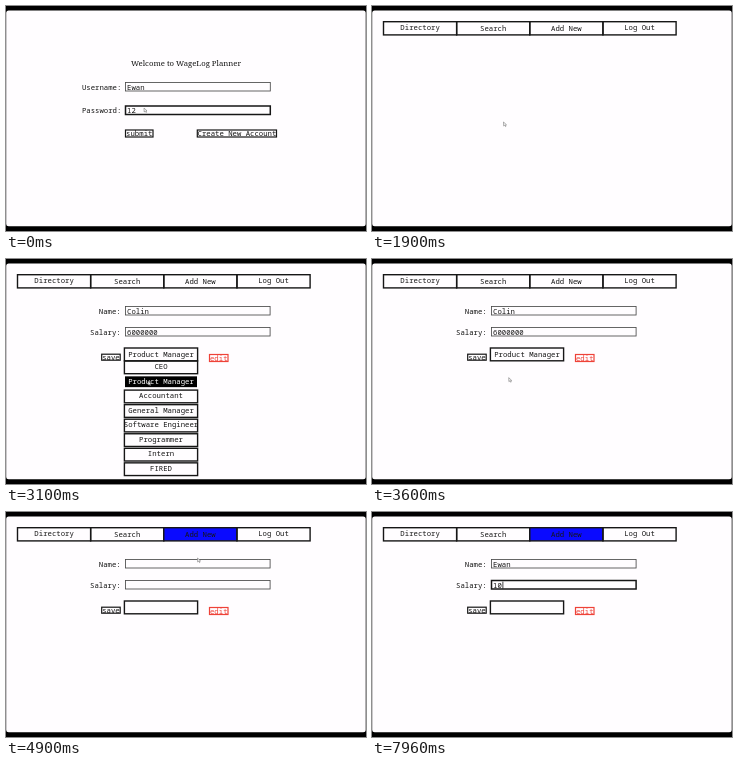
These frames come from a looping animation (360 px wide and 225 px high, 8 s). An HTML page with a canvas:

```html
<!DOCTYPE html>
<html lang="en">
<head>
<meta charset="utf-8">
<style>
html, body { margin: 0; width: 100%; height: 100%; overflow: hidden; background: #000; }
canvas { display: block; width: 360px; height: 225px; }
</style>
</head>
<body>
<canvas id="stage" width="360" height="225"></canvas>
<script>
const ctx = document.getElementById('stage').getContext('2d');
const LOOP = 8000, TRAVEL = 260, KEY_GAP = 150;
const INK = '#161616', GREY = '#4a4a4a', BLUE = '#0a0aff', RED = '#ee4238', PAPER = '#fffdff';
const MONO = '500 7.3px "Noto Sans Mono", "DejaVu Sans Mono", monospace';
const SERIF = '7.75px "Noto Serif", serif';

const NAV = ['Directory', 'Search', 'Add New', 'Log Out'];
const ROLES = ['CEO', 'Product Manager', 'Accountant', 'General Manager',
  'Software Engineer', 'Programmer', 'Intern', 'FIRED'];

const signedIn = 1600, searchOpen = 2440, formOpen = 2740, listOpen = 2900,
  listShut = 3540, searchAgain = 4080, addNew = 4680;

// The pointer rests at each stop until TRAVEL ms before the next arrival
const STOPS = [
  { at: 0, x: 138, y: 102 },
  { at: 700, x: 143, y: 127 },
  { at: 1400, x: 134, y: 84 },
  { at: 1740, x: 131.5, y: 116 },
  { at: 2160, x: 50, y: 22 },
  { at: 2440, x: 120, y: 23 },
  { at: 2700, x: 150, y: 46 },
  { at: 3000, x: 142, y: 122 },
  { at: 3800, x: 104, y: 98 },
  { at: 4060, x: 122, y: 24 },
  { at: 4240, x: 169.5, y: 50 },
  { at: 4600, x: 192, y: 23 },
  { at: 4900, x: 191.5, y: 46 },
  { at: 5460, x: 150, y: 52 },
  { at: 5800, x: 132, y: 75 }
];

function pointerAt(t) {
  return STOPS.reduce((from, to) => {
    const begin = Math.max(from.at, to.at - TRAVEL);
    const u = Math.min(1, Math.max(0, (t - begin) / (to.at - begin)));
    const e = u * u * (3 - 2 * u);
    return { at: to.at, x: from.x + (to.x - from.x) * e, y: from.y + (to.y - from.y) * e };
  });
}

function text(s, x, y, align = 'left', color = INK, font = MONO) {
  ctx.font = font;
  ctx.textAlign = align;
  ctx.fillStyle = color;
  ctx.fillText(s, x, y + 2.5);
}

function box(x, y, w, h, line = 1.3, color = INK, fill) {
  if (fill) {
    ctx.fillStyle = fill;
    ctx.fillRect(x, y, w, h);
  }
  ctx.strokeStyle = color;
  ctx.lineWidth = line;
  ctx.strokeRect(x, y, w, h);
}

const inside = (p, x, y, w, h) => p.x >= x && p.x <= x + w && p.y >= y && p.y <= y + h;

function button(label, x, y, w, h, p, color = INK) {
  box(x, y, w, h, 1.2, color, inside(p, x, y, w, h) ? BLUE : null);
  text(label, x + w / 2, y + h / 2, 'center', color);
}

function field(label, labelX, x, y, w, value, focused) {
  text(label, labelX, y + 4.6, 'right');
  box(x, y, w, 8.5, focused ? 1.5 : 0.85, focused ? INK : GREY);
  text(value, x + 1.5, y + 4.6);
}

function login(t, p) {
  text('Welcome to WageLog Planner', 180, 57, 'center', INK, SERIF);
  field('Username:', 115.3, 119.5, 76.5, 144.8, 'Ewan', false);
  field('Password:', 115.3, 119.5, 100, 144.8, t < 100 ? '12' : '123', true);
  button('submit', 119.5, 124, 27.5, 7, p);
  button('Create New Account', 191.3, 124, 79.2, 7, p);
}

function nav(p, active) {
  const w = 73.15;
  NAV.forEach((label, i) => {
    const x = 11.5 + i * w;
    const lit = i === active || inside(p, x, 15.7, w, 13);
    box(x, 15.7, w, 13.2, 1.4, INK, lit ? BLUE : null);
    text(label, x + w / 2, i % 3 ? 22.6 : 21.8, 'center');
  });
}

function form(p, name, salary, role, focus) {
  field('Name:', 114.7, 119.5, 47.5, 144.6, name, focus === 'name');
  field('Salary:', 114.7, 119.5, 68.5, 144.6, salary, focus === 'salary');
  button('save', 95.7, 95.2, 18.5, 6, p);
  button('edit', 203.5, 95.5, 18.5, 7, p, RED);
  box(118.4, 89, 73.2, 12.8, 1.4);
  text(role, 155, 95, 'center');
}

function roleList(p) {
  const step = 14.55;
  ROLES.forEach((role, i) => {
    const y = 101.2 + i * step;
    const hot = inside(p, 118, y, 74, step);
    if (hot) {
      ctx.fillStyle = '#000';
      ctx.fillRect(119, y + 1.6, 72, 10.8);
    } else {
      box(118.4, y + 0.8, 73.2, 12.7, 1.4);
    }
    text(role, 155, y + 6.4, 'center', hot ? '#fff' : INK);
  });
}

const ARROW = new Path2D('M0 0 L.2 4 L1.1 3.2 L2 4.6 L2.5 4.2 L1.9 2.9 L3 2.8 Z');

function pointer(p) {
  ctx.save();
  ctx.translate(p.x, p.y);
  ctx.fillStyle = '#fff';
  ctx.fill(ARROW);
  ctx.strokeStyle = '#777';
  ctx.lineWidth = 0.6;
  ctx.stroke(ARROW);
  ctx.restore();
}

const typed = (s, t, start, gap = KEY_GAP) =>
  s.slice(0, Math.max(0, Math.floor((t - start) / gap) + 1));

function newEntry(t, p) {
  const salary = typed('10', t, 7600);
  const focus = t < 5520 ? '' : t < 6940 ? 'name' : 'salary';
  form(p, typed('Ewan', t, 5940), salary, '', focus);
  if (t >= 7260) {
    ctx.fillStyle = INK;
    ctx.fillRect(121.3 + salary.length * 4.6, 69.6, 0.8, 7);
  }
}

function draw(t) {
  const p = pointerAt(t);
  ctx.fillStyle = '#000';
  ctx.fillRect(0, 0, 360, 225);
  ctx.fillStyle = PAPER;
  ctx.beginPath();
  ctx.roundRect(0.2, 4.4, 359.5, 215.8, 2.5);
  ctx.fill();

  if (t < signedIn) {
    login(t, p);
  } else {
    nav(p, t >= addNew ? 2 : -1);
    if (t >= addNew) {
      newEntry(t, p);
    } else if (t >= searchAgain || (t >= searchOpen && t < formOpen)) {
      field('Search:', 186.5, 191.7, 40.4, 108.4, '', false);
    } else if (t >= formOpen) {
      form(p, 'Colin', '6000000', 'Product Manager', '');
      if (t >= listOpen && t < listShut) roleList(p);
    }
  }
  if (t < 7740) pointer(p);
}

const start = performance.now();
function tick() {
  draw((performance.now() - start) % LOOP);
  requestAnimationFrame(tick);
}
tick();
</script>
</body>
</html>
```
